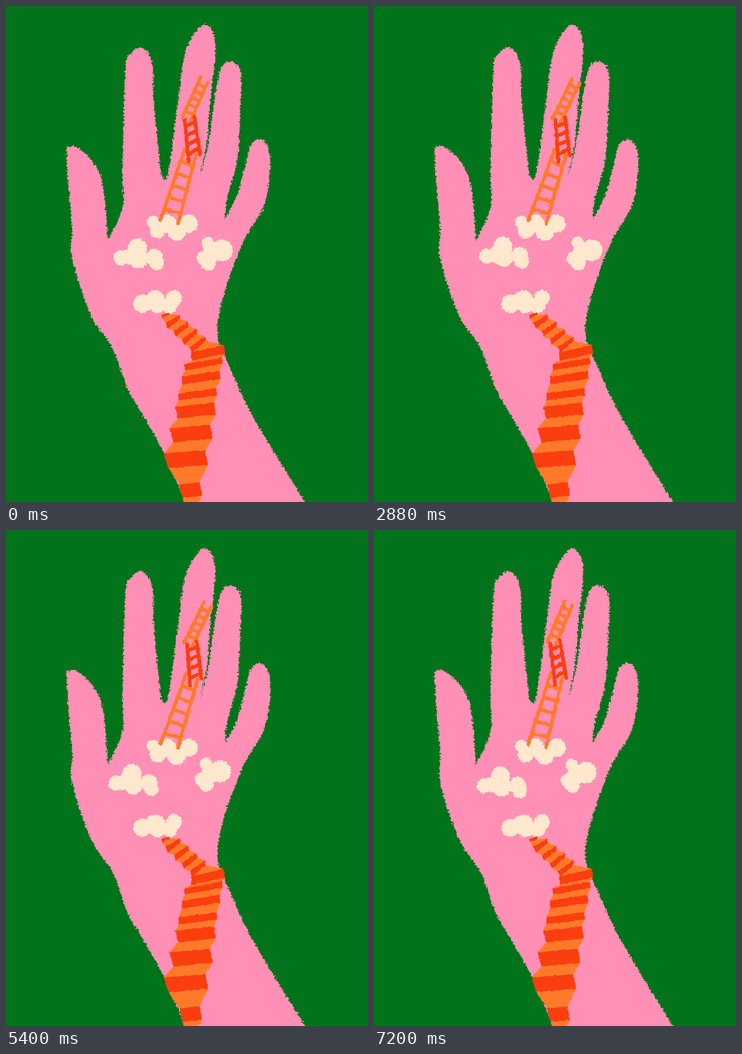
An HTML page that plays this animation: 640x875 px, repeating every 7320 ms.

```html
<!DOCTYPE html>
<html lang="en">
<head>
<meta charset="utf-8">
<title>Hand, clouds and ladders</title>
<style>
html, body { margin: 0; width: 100%; height: 100%; overflow: hidden; background: #00731b; }
svg { display: block; width: 100vw; height: 100vh; }
</style>
</head>
<body>
<svg viewBox="0 0 640 875">
  <defs id="defs"></defs>
  <rect width="640" height="875" fill="#00731b"/>
  <g id="hand" fill="#ff8fb4" filter="url(#rough)"></g>
  <g id="clouds" fill="#ffe8cd" filter="url(#soft)"></g>
  <g id="stairs" filter="url(#fine)"></g>
  <g filter="url(#fine)"><g id="ladders" fill="none" stroke-linecap="round"></g></g>
</svg>
<script>
const LOOP = 7320, STEP = 360;
const ORANGE = '#ff7a28', RED = '#fb3e0e';
const $ = id => document.getElementById(id);

function add(parent, tag, attrs) {
  const el = document.createElementNS('http://www.w3.org/2000/svg', tag);
  for (const k in attrs) el.setAttribute(k, attrs[k]);
  return parent.appendChild(el);
}

// Crayon edges: displacement by noise that is reseeded on every step.
const noises = [];
function edge(id, freq, scale) {
  const f = add($('defs'), 'filter', {
    id, filterUnits: 'userSpaceOnUse', x: 0, y: 0, width: 640, height: 875,
    'color-interpolation-filters': 'sRGB'
  });
  noises.push(add(f, 'feTurbulence', {
    type: 'fractalNoise', baseFrequency: freq, numOctaves: 2
  }));
  add(f, 'feColorMatrix', {
    values: '1 0 0 0 0  0 1 0 0 0  0 0 1 0 0  0 0 0 0 1', result: 'noise'
  });
  add(f, 'feDisplacementMap', {
    in: 'SourceGraphic', in2: 'noise', scale,
    xChannelSelector: 'R', yChannelSelector: 'G'
  });
}
edge('rough', 0.28, 8);
edge('soft', 0.25, 6);
edge('fine', 0.16, 4);

// Smooth run through a few points; its ends stay corners.
function curve(text) {
  const pts = text.trim().split(/\s+/).map(p => p.split(',').map(Number));
  const at = i => pts[Math.max(0, Math.min(pts.length - 1, i))];
  let d = '';
  for (let i = 0; i < pts.length - 1; i++) {
    const [a, b, c, e] = [at(i - 1), at(i), at(i + 1), at(i + 2)];
    const h1 = b.map((v, k) => v + (c[k] - a[k]) / 6);
    const h2 = c.map((v, k) => v - (e[k] - b[k]) / 6);
    d += `C${h1} ${h2} ${c}`;
  }
  return d;
}

const arm = '323,890 280,790 238,715 215,675 188,603 150,545 117,445 117,390 109,300 107,249';
const thumb = '107,249 125,249 155,277 172,320 180,414';
const index = '180,414 206,355 206,290 211,115 220,85 237,73 252,84 260,113 261,165 274,297';
const middle = `274,297 286,297 304,170 316,85 337,43 356,34 370,70 361,170 355,240 343,299`;
const ring = `343,299 358,240 371,150 381,108 398,98 415,117 414,185 409,270 391,338 387,376`;
const little = `387,376 408,335 423,282 432,247 448,235 463,248 467,290 455,355 420,415
  385,510 374,580 397,640 440,730 538,890`;
add($('hand'), 'path', {
  d: 'M323,890' + [arm, thumb, index, middle, ring, little].map(curve).join('') + 'Z'
});

// A cloud is a few overlapping puffs: x, y, radius.
function cloud(...puffs) {
  const g = add($('clouds'), 'g', {});
  for (const [cx, cy, r] of puffs) add(g, 'circle', { cx, cy, r });
  return g;
}
cloud([260, 381, 11], [268, 396, 14], [285, 384, 16], [302, 397, 17], [323, 384, 16]);
cloud([241, 525, 16], [264, 520, 18], [268, 529, 13], [289, 528, 14], [297, 515, 14]);
const leftCloud = cloud([203, 444, 13], [218, 442, 14], [232, 427, 17], [234, 446, 17],
  [262, 443, 15], [266, 453, 13]);
const rightCloud = cloud([357, 418, 11], [382, 431, 19], [349, 445, 12], [358, 454, 13],
  [364, 436, 16]);

// Risers as corners: top left, top right, bottom right, bottom left.
const risers = [[[275, 545], [289, 540], [289, 545], [276, 551]]];
for (let i = 0; i < 4; i++) {
  const x = 282 + 14.3 * i, y = 559 + 14.3 * i, rx = 307 + 15 * i, ry = 544 + 13 * i;
  risers.push([[x, y], [rx, ry], [rx + 1, ry + 8], [x + 4, y + 10]]);
}
// Lower flight: left corner and height; the right side follows one slanted line.
[
  [327, 611, 15], [316, 632, 11], [311, 654, 14], [305, 683, 13],
  [299, 707, 21], [289, 745, 25], [279, 789, 26], [306, 844, 24], [317, 890, 20]
].forEach(([x, y, h], i) => {
  const ry = y - 13 + 1.3 * i, rx = 386 - (ry - 597) * 0.18;
  const lean = Math.max(0, (h - 13) * 0.6);
  risers.push([[x, y], [rx, ry], [rx + 1 + lean / 2, ry + h], [x + lean, y + h]]);
});
const poly = (pts, fill) => add($('stairs'), 'polygon', { points: pts.join(' '), fill });
risers.forEach((r, i) => {
  const next = risers[i + 1];
  if (next) poly([r[3], r[2], next[1], next[0]], ORANGE);
});
risers.forEach(r => poly(r, RED));

// Two rails given by their ends, with evenly spaced rungs between.
function ladder(left, right, count, stroke, width) {
  const on = ([x1, y1, x2, y2], f) => [x1 + (x2 - x1) * f, y1 + (y2 - y1) * f];
  const line = (a, b) => `M${a}L${b}`;
  let d = line(on(left, 0), on(left, 1)) + line(on(right, 0), on(right, 1));
  for (let i = 0; i < count; i++) {
    const f = 0.15 + 0.68 * i / (count - 1);
    d += line(on(left, f), on(right, f));
  }
  add($('ladders'), 'path', { d, stroke, 'stroke-width': width });
}
ladder([273, 378, 316, 252], [304, 384, 336, 262], 5, ORANGE, 6);
ladder([344, 126, 311, 198], [357, 134, 326, 203], 5, ORANGE, 6);
ladder([316, 201, 323, 274], [333, 195, 343, 262], 4, RED, 6.5);

// Eased travel from 0 through [step, value] stops.
function glide(step, ...stops) {
  let [t0, v0] = [0, 0];
  for (const [t1, v1] of stops) {
    if (step <= t1) {
      const f = (step - t0) / (t1 - t0);
      return v0 + (v1 - v0) * (1 - Math.cos(Math.PI * f)) / 2;
    }
    [t0, v0] = [t1, v1];
  }
  return v0;
}

const move = (el, x, y) => el.setAttribute('transform', `translate(${x} ${y})`);

let shown = -1;
function draw(ms) {
  const step = Math.floor((ms % LOOP) / STEP);
  if (step === shown) return;
  shown = step;
  const turn = glide(step, [12.5, 2.15], [20.5, -1.45]);
  $('ladders').setAttribute('transform', `rotate(${turn} 288 382)`);
  move(leftCloud, glide(step, [17.5, -9.7], [21, -8]), glide(step, [7.5, -3], [21, 7.3]));
  move(rightCloud, glide(step, [6, 3.6], [21, -7.2]),
    glide(step, [4, 1.5], [16.5, -5.4], [21, -3]));
  noises.forEach((n, i) => n.setAttribute('seed', step * 3 + i + 1));
}

const start = performance.now();
function tick() {
  draw(performance.now() - start);
  requestAnimationFrame(tick);
}
tick();
</script>
</body>
</html>
```
